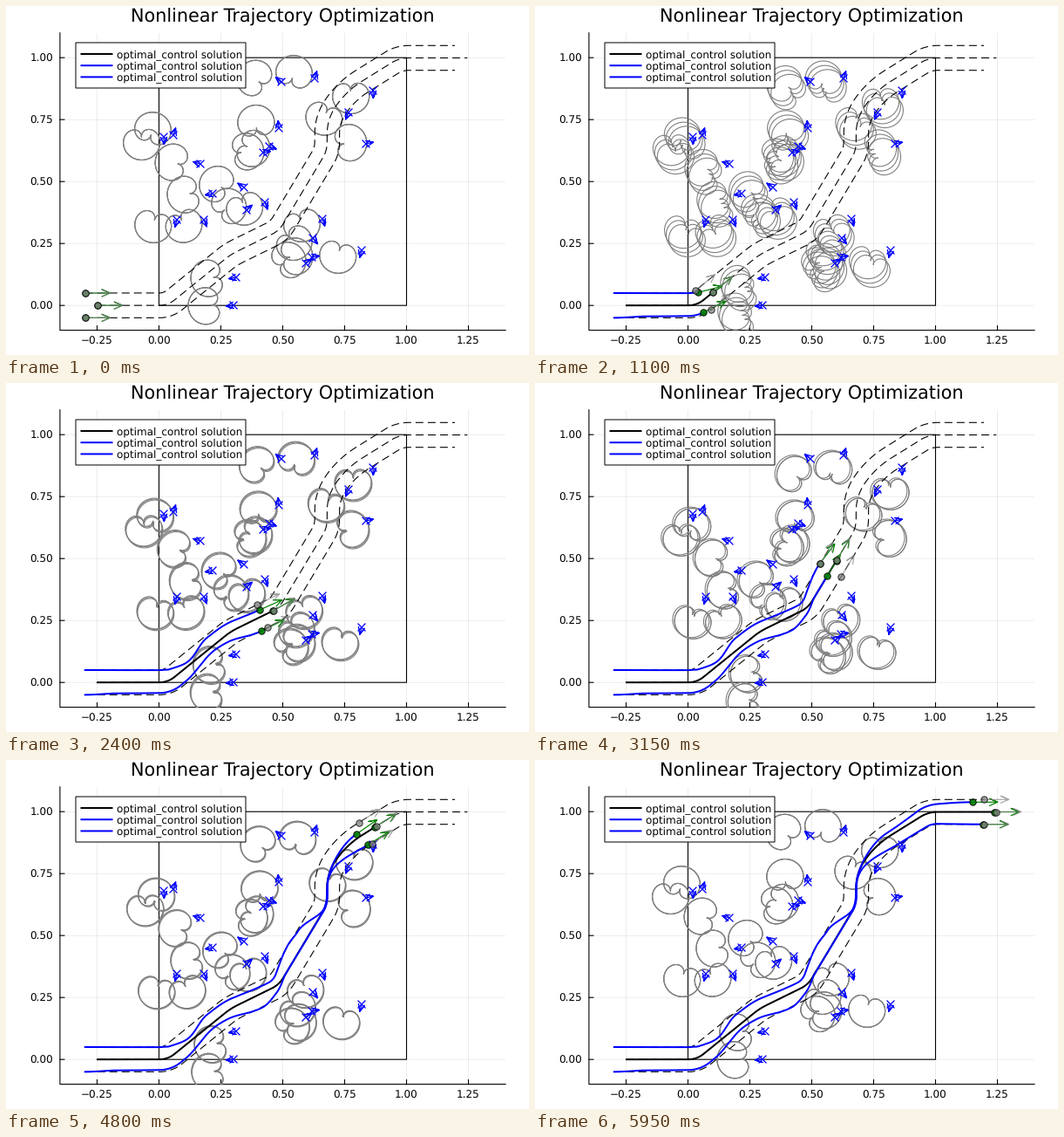
A matplotlib script that plays this animation: 600 px wide and 400 px high, repeating every 6 s.

```python
import numpy as np
import matplotlib.pyplot as plt
from matplotlib.animation import FuncAnimation
from matplotlib.patches import Rectangle

plt.rcParams.update({"font.family": "DejaVu Sans", "text.hinting": "none",
                     "path.snap": False})

W, H, DPI = 600, 400, 100
FRAMES, SUB = 120, 10             # frames per loop, samples per frame
UNIT, X0, Y0 = 284, 175.5, 343.2  # pixels per unit, origin in pixels
STEP = UNIT / 60                  # reference speed per frame
SIDE = 0.05 * UNIT                # formation spacing
LAG = 3                           # frames the followers trail the leader
ARROW = 0.1 * UNIT
LEAD = 0.09 * UNIT                # zone shift against the robot heading
PT = 72 / DPI                     # one pixel in points


def px(x):
    return X0 + UNIT * x


def py(y):
    return Y0 - UNIT * y


LEFT, RIGHT, TOP, BOTTOM = px(-0.4), px(1.4), py(1.1), py(-0.1)

fig = plt.figure(figsize=(W / DPI, H / DPI), dpi=DPI, facecolor="white")
ax = fig.add_axes([0, 0, 1, 1])
ax.set(xlim=(0, W), ylim=(H, 0))
ax.axis("off")
area = Rectangle((LEFT, TOP), RIGHT - LEFT, BOTTOM - TOP, transform=ax.transData)


def line(x=(), y=(), color="black", width=1.1, clip=True, **kw):
    ln, = ax.plot(x, y, color=color, lw=width * PT, **kw)
    if clip:
        ln.set_clip_path(area)
    return ln


def label(x, y, s, size=12, ha="center", **kw):
    ax.text(x, y, s, fontsize=size * PT, ha=ha, va="baseline", **kw)


def arrow(x, y, angle, length, head=9, half=4):
    """Shaft and open head as one polyline; angle is counter-clockwise."""
    c, s = np.cos(angle), np.sin(angle)
    u = np.array([0, length, length - head, length, length - head])
    v = np.array([0, 0, half, 0, -half])
    return x + u * c - v * s, y - u * s - v * c


def ease(t, *keys):
    """Smooth steps between (time, value) keys."""
    kt, kv = np.array(keys, float).T
    i = np.clip(np.searchsorted(kt, t, side="right") - 1, 0, len(kt) - 2)
    u = np.clip((t - kt[i]) / (kt[i + 1] - kt[i]), 0, 1)
    return kv[i] + (kv[i + 1] - kv[i]) * u * u * (3 - 2 * u)


# Leader path: constant speed, a few turns (middle, degrees, duration)
TURNS = [(17, 39, 4), (36.5, -13, 4), (49.5, 33, 4), (72, 31, 4),
         (79.5, -34, 7), (87.5, -24, 9), (102.6, -32, 4.5)]
RUNUP = 10
grid = np.arange(-RUNUP * SUB, (FRAMES - 1) * SUB + 1) / SUB
heading = np.radians(sum(a * np.clip((grid - m) / d + 0.5, 0, 1) for m, a, d in TURNS))
lead_x = px(-0.25) + STEP * (np.cumsum(np.cos(heading)) / SUB - RUNUP)
lead_y = py(0) - STEP * np.cumsum(np.sin(heading)) / SUB


def along(s, left=0):
    """Point beside the leader path at arc time s."""
    h = np.interp(s, grid, heading)
    return (np.interp(s, grid, lead_x) - left * np.sin(h),
            np.interp(s, grid, lead_y) - left * np.cos(h))


def drive(s, left=0):
    """Path with the heading of its motion."""
    x, y = along(s, left)
    return x, y, np.arctan2(-np.gradient(y), np.gradient(x))


time = grid[RUNUP * SUB:]
refs = [drive(time), drive(time - LAG, SIDE), drive(time - LAG, -SIDE)]

# Driven robots leave the formation to pass the narrow places
upper_gap = ease(time, (0, 14.2), (19, 14), (27, 4), (34, 11.5), (50, 7.5),
                 (62, 14.8), (66, 13), (75, 0.5), (84, 0), (96, 4.6), (119, 11.2))
lower_gap = ease(time, (0, -14.2), (8, -12.5), (25, -12), (35, -5), (48, -15),
                 (57, 0), (82, -0.5), (96, -13), (119, -14.2))
upper_lag = ease(time, (0, 3), (63, 3), (82, 4.6), (119, 5.7))
lower_lag = ease(time, (0, 3), (33, 4.8), (82, 4.4), (119, 3.2))
robots = [drive(time - ease(time, (0, 0), (119, 0.5))),
          drive(time - upper_lag, upper_gap),
          drive(time - lower_lag, lower_gap)]

# Agents in the way: x, y, direction in degrees
agents = [
    (192, 148, 72), (181, 150, -88), (223, 181, 163), (237, 215, 190),
    (273, 208, 145), (276, 234, 42), (297, 225, -70), (196, 245, -105),
    (227, 245, -67), (264, 311, 190), (261, 343, 187), (316, 87, 140),
    (354, 83, 72), (313, 140, 95), (295, 168, 10), (302, 161, -20),
    (393, 122, -113), (421, 97, -88), (413, 158, 12), (363, 244, -72),
    (352, 266, -52), (344, 295, 35), (351, 288, 10), (408, 280, -105)]

phi = np.linspace(-np.pi, np.pi, 90)
radius = 26.5 * np.clip(np.cos(phi / 2), 0, 1) ** 0.85
ring_x, ring_y = [], []
for x, y, deg in agents:
    a = phi + np.radians(deg)
    ring_x += [*(x + radius * np.cos(a)), np.nan]
    ring_y += [*(y - radius * np.sin(a)), np.nan]
ring_x, ring_y = np.array(ring_x), np.array(ring_y)

# Axes, grid and labels
for v in np.arange(-1, 6) / 4:
    x = px(v)
    line([x, x], [TOP, BOTTOM], width=0.7, alpha=0.1, zorder=0)
    line([x, x], [BOTTOM, BOTTOM - 5], clip=False)
    label(x, 388, f"{v:.2f}".replace("-", "\u2212"))
for v in np.arange(5) / 4:
    y = py(v)
    line([LEFT, RIGHT], [y, y], width=0.7, alpha=0.1, zorder=0)
    line([LEFT, LEFT + 5], [y, y], clip=False)
    label(54, y + 4.4, f"{v:.2f}", ha="right")
line([LEFT, LEFT, RIGHT], [TOP, BOTTOM, BOTTOM], clip=False)
label((LEFT + RIGHT) / 2, 19, "Nonlinear Trajectory Optimization", size=20.75)

line(px(np.array([0, 1, 1, 0, 0])), py(np.array([0, 0, 1, 1, 0])))
for x, y, _ in refs:
    line(x, y, width=1.1, zorder=3, dashes=(9 / 1.1, 5 / 1.1), dash_capstyle="butt")
for x, y, deg in agents:
    for d in (-4, 4):
        line([x - 4, x + 4], [y - d, y + d], "blue", 1.3, zorder=4)
    line(*arrow(x, y, np.radians(deg), 8.5, 8, 3.5), "blue", 1.3, zorder=4)

# Legend
COLORS = "black", "blue", "blue"
ax.add_patch(Rectangle((80, 42), 195, 52, fc="white", ec="black", lw=PT, zorder=20))
for i, color in enumerate(COLORS):
    y = 55 + 13.2 * i
    line([85.5, 122.5], [y, y], color, 2, zorder=21, solid_capstyle="butt")
    label(127, y + 4.2, "optimal_control solution", ha="left", zorder=21)


# Animated parts, one of each per robot
def dot(color, alpha, z):
    return line(color=color, marker="o", ms=7.4 * PT, mec="black", mew=PT,
                alpha=alpha, zorder=z)


zones = [line(color="gray", zorder=2) for _ in robots]
trails = [line(color=c, width=2, zorder=5) for c in COLORS]
arrows = [line(color="green", width=1.2, zorder=6) for _ in robots]
dots = [dot("green", 0.9, 7) for _ in robots]
ref_arrows = [line(color="gray", width=1.2, alpha=0.7, zorder=8) for _ in refs]
ref_dots = [dot("gray", 0.75, 9) for _ in refs]


def place(mark, tip, x, y, a):
    mark.set_data([x], [y])
    tip.set_data(*arrow(x, y, a, ARROW))


def update(frame):
    k = frame * SUB
    for i, (x, y, a) in enumerate(robots):
        zones[i].set_data(ring_x - LEAD * np.cos(a[k]), ring_y + LEAD * np.sin(a[k]))
        trails[i].set_data(x[:k + 1], y[:k + 1])
        place(dots[i], arrows[i], x[k], y[k], a[k])
        place(ref_dots[i], ref_arrows[i], *(v[k] for v in refs[i]))
    return zones + trails + arrows + dots + ref_arrows + ref_dots


anim = FuncAnimation(fig, update, frames=FRAMES, interval=50, repeat=True,
                     repeat_delay=0, blit=False)
plt.show()
```
